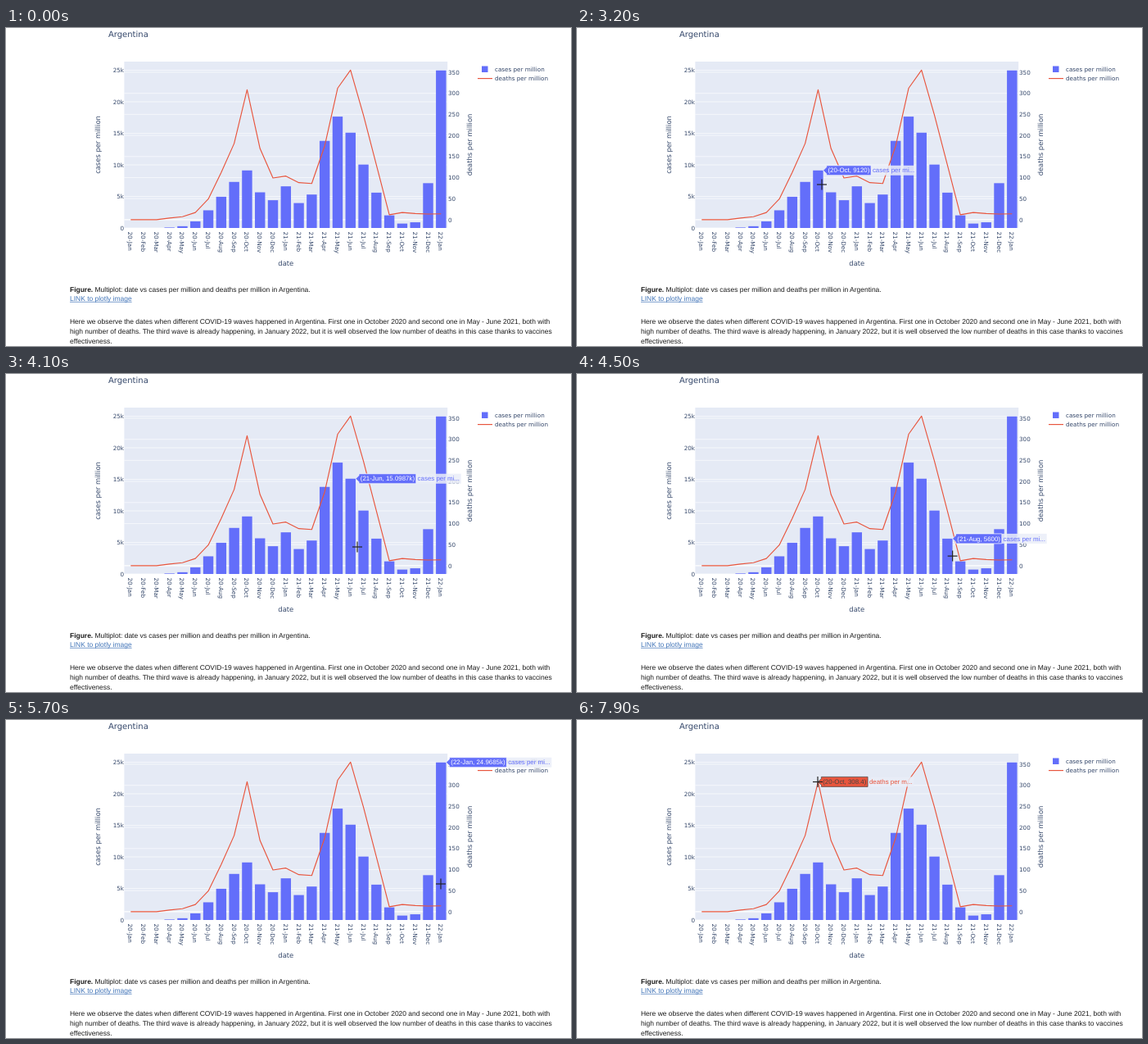
An HTML page with a canvas that plays this animation: 690 by 388 pixels, repeating every 8 s.

```html
<!DOCTYPE html>
<html lang="en">
<head>
<meta charset="utf-8">
<style>
  html, body { margin: 0; width: 100%; height: 100%; overflow: hidden; background: #fff; }
  canvas { display: block; }
</style>
</head>
<body>
<canvas id="stage" width="690" height="388"></canvas>
<script>
const ctx = document.getElementById('stage').getContext('2d');
ctx.textRendering = 'geometricPrecision';

const LOOP = 8000, STEP = 100;
const PLOT = { left: 144.4, right: 539.2, top: 41, bottom: 244 };
const SLOT = (PLOT.right - PLOT.left) / 25;
const BAR = SLOT * 0.8 - 0.2;
const BLUE = '#636efa', RED = '#e8553d', INK = '#34476a';
const CHART_FONT = '"DejaVu Sans", Verdana, sans-serif';
const TEXT_FONT = '"Liberation Sans", Arial, sans-serif';

// Monthly values; the first three months are close to zero
const quiet = [0, 0, 0];
const cases = [...quiet, 80, 280, 1050, 2800, 4950, 7300, 9120, 5650, 4400, 6600, 3950, 5300,
  13800, 17650, 15098.7, 10050, 5600, 2000, 700, 900, 7100, 24968.5];
const deaths = [...quiet, 4, 7, 17, 49, 112, 181, 308.4, 169, 99, 103.6, 88, 85.94,
  175, 312, 355, 248, 130, 11.6, 17, 14.5, 13.5, 14];
const MONTHS = 'Jan Feb Mar Apr May Jun Jul Aug Sep Oct Nov Dec'.split(' ');
const labels = cases.map((_, i) => `${20 + Math.floor(i / 12)}-${MONTHS[i % 12]}`);

const xAt = i => PLOT.left + (i + 0.5) * SLOT;
const casesY = v => PLOT.bottom - v * 0.0077;
const deathsY = v => 233.9 - v * 0.514;

// Pointer stops: time, x, y
const stops = [
  [1800, 206, 370], [2600, 295, 221], [3000, 295, 221], [3200, 299, 191], [3800, 372, 190],
  [4100, 429, 211], [4700, 469, 226], [5200, 469, 226], [5300, 486, 233], [5700, 531, 200],
  [7100, 531, 200], [7200, 486, 244], [7900, 294, 75.5]
];

function pointerAt(t) {
  const next = stops.findIndex(s => s[0] >= t);
  if (t < stops[0][0] || next < 0) return null;
  const [t1, x1, y1] = stops[next];
  const [t0, x0, y0] = stops[Math.max(next - 1, 0)];
  const f = t1 > t0 ? (t - t0) / (t1 - t0) : 1;
  const ease = f * f * (3 - 2 * f);
  return [x0 + (x1 - x0) * ease, y0 + (y1 - y0) * ease];
}

// A bar under the pointer wins, otherwise a nearby point of the line
function hoverAt([x, y]) {
  const month = Math.floor((x - PLOT.left) / SLOT);
  if (y < PLOT.bottom && y > casesY(cases[month])) return ['cases', month];
  const near = deaths.findIndex((v, i) => Math.hypot(xAt(i) - x, deathsY(v) - y) < 16);
  return near < 0 ? null : ['deaths', near];
}

function text(str, x, y, { size = 7.2, font = CHART_FONT, color = INK, align = 'left', weight = '', turn = 0 } = {}) {
  ctx.save();
  ctx.translate(x, y);
  ctx.rotate(turn * Math.PI / 2);
  ctx.font = `${weight} ${size}px ${font}`;
  ctx.fillStyle = color;
  ctx.textAlign = align;
  ctx.fillText(str, 0, 0);
  const width = ctx.measureText(str).width;
  ctx.restore();
  return width;
}

function rect(x, y, w, h, color) {
  ctx.fillStyle = color;
  ctx.fillRect(x, y, w, h);
}

function line(points, color, width) {
  ctx.beginPath();
  points.forEach(p => ctx.lineTo(...p));
  ctx.strokeStyle = color;
  ctx.lineWidth = width;
  ctx.lineJoin = 'round';
  ctx.stroke();
}

function gridLine(y, width = 0.6) {
  line([[PLOT.left, y], [PLOT.right, y]], '#fff', width);
}

function drawChart() {
  text('Argentina', 125, 11, { size: 10 });
  rect(PLOT.left, PLOT.top, PLOT.right - PLOT.left, PLOT.bottom - PLOT.top, '#e5eaf5');
  for (let k = 0; k <= 25; k += 5) {
    gridLine(casesY(k * 1000));
    text(k ? k + 'k' : '0', 144, casesY(k * 1000) + 2.6, { align: 'right' });
  }
  for (let v = 0; v <= 350; v += 50) {
    gridLine(deathsY(v), v ? 0.6 : 1.2);
    text(v, 540, deathsY(v) + 2.6);
  }
  cases.forEach((v, i) => {
    rect(xAt(i) - BAR / 2, casesY(v), BAR, PLOT.bottom - casesY(v), BLUE);
    text(labels[i], xAt(i) - 3, 248.5, { turn: 1 });
  });
  line(deaths.map((v, i) => [xAt(i), deathsY(v)]), RED, 1.15);

  const title = { size: 8.4, align: 'center' };
  text('date', 341.8, 290, title);
  text('cases per million', 115.2, 142.5, { ...title, turn: -1 });
  text('deaths per million', 568.7, 142.5, { ...title, turn: -1 });

  rect(581, 46.5, 7.5, 7.5, BLUE);
  line([[576, 61.6], [594, 61.6]], RED, 1.15);
  text('cases per million', 597, 52.8);
  text('deaths per million', 597, 64.3);
}

function drawCaption() {
  const body = { size: 8.46, font: TEXT_FONT, color: '#1a1a1a' };
  const link = { ...body, color: '#4275b8' };
  const lead = text('Figure.', 78, 321.5, { ...body, weight: 'bold' });
  text(' Multiplot: date vs cases per million and deaths per million in Argentina.', 78 + lead, 321.5, body);
  const width = text('LINK to plotly image', 78, 333, link);
  line([[78, 334.3], [78 + width, 334.3]], link.color, 0.7);
  [
    'Here we observe the dates when different COVID-19 waves happened in Argentina. First one in October 2020 and second one in May - June 2021, both with',
    'high number of deaths. The third wave is already happening, in January 2022, but it is well observed the low number of deaths in this case thanks to vaccines',
    'effectiveness.'
  ].forEach((row, i) => text(row, 78, 361 + i * 12, body));
}

function drawHover(series, i) {
  const isBar = series === 'cases';
  const value = (isBar ? cases : deaths)[i];
  const color = isBar ? BLUE : RED;
  const edge = isBar ? '#fff' : '#444';
  const tip = xAt(i) + (isBar ? BAR / 2 : 0);
  const y = isBar ? casesY(value) : deathsY(value);
  const label = `(${labels[i]}, ${value >= 10000 ? +(value / 1000).toFixed(4) + 'k' : value})`;
  const name = isBar ? 'cases per mi...' : 'deaths per m...';
  const style = { size: 7.9, font: TEXT_FONT };

  ctx.font = `${style.size}px ${TEXT_FONT}`;
  const left = tip + 4;
  const right = left + ctx.measureText(label).width + 3.6;
  rect(right, y - 6, ctx.measureText(name).width + 3.6, 12, 'rgba(234,238,248,0.86)');

  ctx.beginPath();
  [[tip, y], [left, y - 4], [left, y - 6], [right, y - 6], [right, y + 6], [left, y + 6], [left, y + 4]]
    .forEach(p => ctx.lineTo(...p));
  ctx.closePath();
  ctx.fillStyle = color;
  ctx.fill();
  ctx.strokeStyle = edge;
  ctx.lineWidth = 0.7;
  ctx.stroke();
  text(label, left + 1.8, y + 2.7, { ...style, color: edge });
  text(name, right + 1.8, y + 2.7, { ...style, color });
}

function drawPointer([x, y]) {
  if (y > 305) {
    line([[x, y - 4], [x, y + 4]], '#222', 1);
    for (const end of [-4, 4]) line([[x - 2, y + end], [x + 2, y + end]], '#222', 0.8);
  } else {
    line([[x - 6, y], [x + 6, y]], '#222', 1.2);
    line([[x, y - 6.5], [x, y + 6.5]], '#222', 1.2);
  }
}

function frame() {
  const t = Math.floor(performance.now() % LOOP / STEP) * STEP;
  rect(0, 0, 690, 388, '#fff');
  drawChart();
  drawCaption();
  // The hover label trails the pointer by one step
  const trail = pointerAt(t - STEP);
  const hover = trail && hoverAt(trail);
  if (hover) drawHover(...hover);
  const pointer = pointerAt(t);
  if (pointer) drawPointer(pointer);
  requestAnimationFrame(frame);
}
frame();
</script>
</body>
</html>
```
